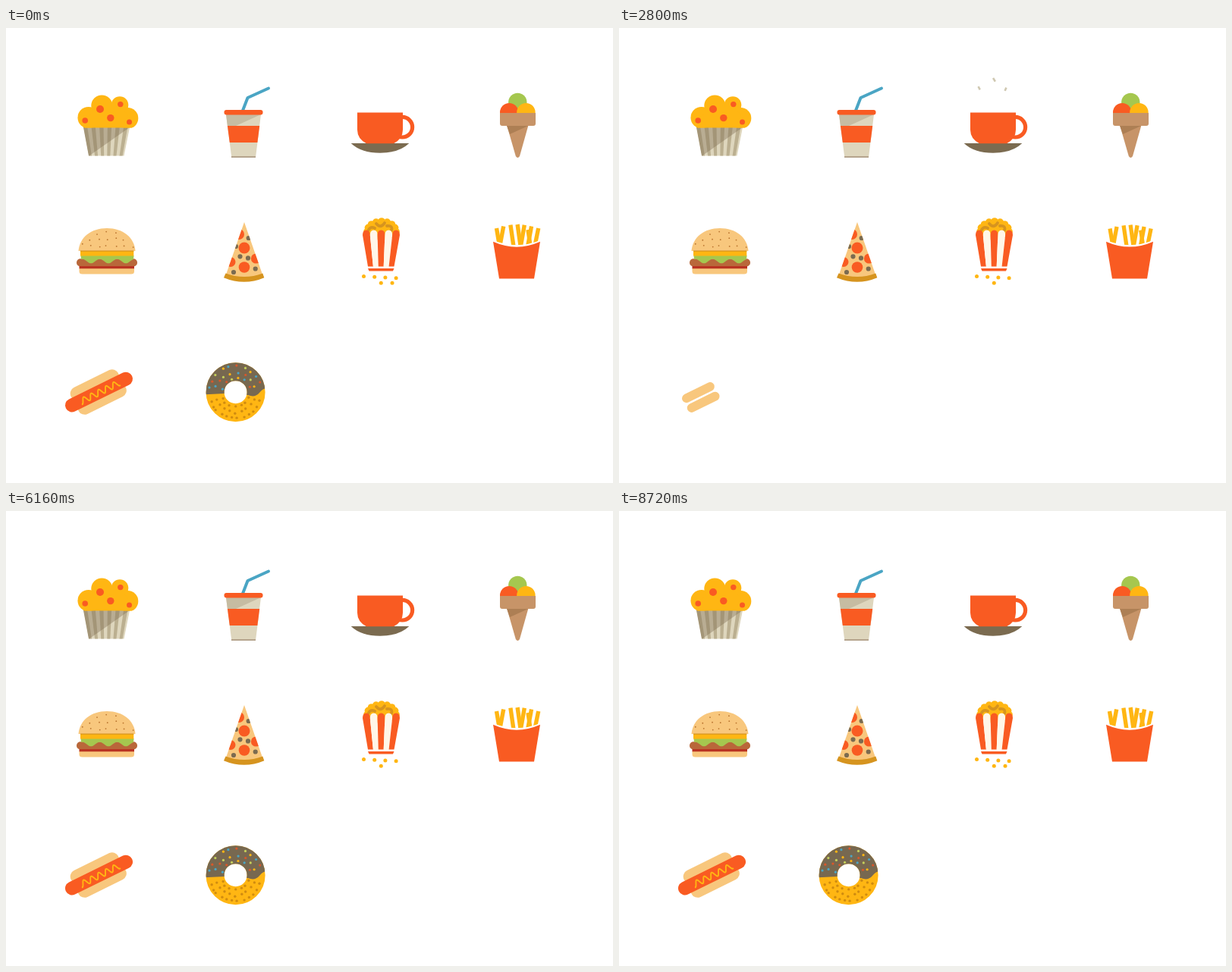
Animation of 800 by 600 pixels, one loop 8.76 s. Source, as an HTML page:

```html
<!DOCTYPE html>
<html lang="en">
<head>
<meta charset="utf-8">
<title>Food icons</title>
<style>
html, body { margin: 0; width: 100%; height: 100%; overflow: hidden; background: #fff; }
svg { display: block; width: 800px; height: 600px; }
.o { fill: #f95b22; } .y { fill: #ffb613; } .c { fill: #ded6bd; } .d { fill: #7b6b50; }
.t { fill: #c79468; } .b { fill: #f8c77d; } .g { fill: #a5c74f; } .k { fill: #d6941f; }
.line { fill: none; stroke-linecap: round; stroke-linejoin: round; }
.cut { stroke-linecap: butt; }
</style>
</head>
<body>
<!-- data-pop: pivot x, pivot y, start time in ms -->
<svg viewBox="0 0 800 600">
  <defs>
    <clipPath id="wrapClip"><path d="M102 131H163L155.5 168.5H109Z"/></clipPath>
    <clipPath id="topClip"><path d="M90 80H180V131.5H90Z"/></clipPath>
    <clipPath id="scoopClip"><path d="M640 60H710V113H640Z"/></clipPath>
    <clipPath id="sliceClip"><path d="M314 256L290 325Q314 334 338 325Z"/></clipPath>
    <clipPath id="glazeClip"><path d="M258 435H347V474Q338 475 334 481Q328 488 319 484L288 482L258 483.5Z"/></clipPath>
  </defs>

  <g data-pop="132 168 40" clip-path="url(#wrapClip)">
    <path class="c" d="M100 131H165V169H100Z"/>
    <g id="pleats" fill="#bbaf90"></g>
    <path d="M100 131H163L109 169H100Z" fill="#7d6a50" opacity=".38"/>
  </g>
  <g data-pop="134 131 140">
    <g class="y" clip-path="url(#topClip)">
      <circle cx="108.8" cy="118.2" r="14.3"/><circle cx="126.3" cy="102.5" r="14"/>
      <circle cx="150" cy="101.5" r="11.3"/><circle cx="160.3" cy="119" r="14"/>
      <path d="M103 122L120 104H152L166 122V132H103Z"/>
    </g>
    <g class="o">
      <circle cx="124" cy="107" r="5"/><circle cx="150.8" cy="100.6" r="3.7"/>
      <circle cx="137.8" cy="118.6" r="4.7"/><circle cx="104.2" cy="122" r="3.8"/>
      <circle cx="162.5" cy="124" r="3.5"/>
    </g>
  </g>

  <g data-pop="313 170 540">
    <path id="straw" class="line" d="M310 114L318.5 92L346 79.5" stroke="#4aa5c4" stroke-width="4"/>
    <path class="c" d="M290 114H336L329 170.5H297.3Z"/>
    <path d="M290 114H336L303 129H291.9Z" fill="#c6bca2"/>
    <path class="o" d="M291.9 129H334.2L331.4 151H294.8Z"/>
    <path d="M297 169H329V171H297Z" fill="#b5a48d"/>
    <rect class="o" x="287.5" y="108" width="51" height="6.6" rx="3"/>
  </g>

  <g data-pop="493 158 820">
    <circle class="line" cx="522.3" cy="130.7" r="13.3" stroke="#f95b22" stroke-width="5.2"/>
    <path class="d" d="M454.7 152H531.3Q518 164.7 493 164.7T454.7 152Z"/>
    <path class="o" d="M463 111.5H523V134Q523 146 511 152.3H475Q463 146 463 134Z"/>
  </g>
  <g id="steam" class="line cut" stroke="#cfc8b1" stroke-width="2.6">
    <path pathLength="1" d="M472 105Q471 98 475.5 95.5C480 92 478.5 86 473.5 77"/>
    <path pathLength="1" d="M491.3 97Q492 91 496 87C501 81 499 75 493 66"/>
    <path pathLength="1" d="M507 104.5Q513.5 101 512.5 96C509 90 506 87 510.5 78.5"/>
  </g>

  <circle id="ball" class="g" cx="674.3" cy="98" r="12.2"/>
  <g id="cone">
    <g clip-path="url(#scoopClip)">
      <circle data-pop="663 112 590" class="o" cx="663.2" cy="111.2" r="12.2"/>
      <circle data-pop="685 112 640" class="y" cx="685.4" cy="111.2" r="12.2"/>
    </g>
    <path class="t" d="M660 128H688.5L677 169Q674.3 173 671.8 169Z"/>
    <path d="M660 129H688.2L664 140Z" fill="#ad7f54"/>
    <path class="t" d="M651 112H698V126Q698 129 695 129H654Q651 129 651 126Z"/>
  </g>

  <g id="burger">
    <path class="b" d="M96.5 317H169V321Q169 324.5 165 324.5H100.5Q96.5 324.5 96.5 321Z"/>
    <g>
      <rect x="93" y="304.3" width="80" height="10.2" rx="5" fill="#b9673a"/>
      <path d="M96.5 314H169V317.3H96.5Z" fill="#b93322"/>
    </g>
    <path id="lettuce" class="g"/>
    <path class="y" d="M98 294H168.3V300.6H98Z"/>
    <g>
      <path class="b" d="M95.5 294C97 276 112 264 133 264S169 276 170.5 294Z"/>
      <path class="k" d="M98 293.5H168.3V294.8H98Z"/>
      <g id="seeds" fill="#b9742f"></g>
    </g>
  </g>

  <g data-pop="314 295 1360">
    <g clip-path="url(#sliceClip)">
      <path class="b" d="M285 250H343V340H285Z"/>
      <g class="o">
        <circle cx="314" cy="290" r="7.5"/><circle cx="307" cy="272" r="7"/><circle cx="296" cy="308.5" r="6.5"/>
        <circle cx="314" cy="315.5" r="7.3"/><circle cx="329.5" cy="304" r="6.6"/>
      </g>
      <path class="line" stroke="#7b6b50" stroke-width="6.2"
        d="M319.7 277h0M308.5 301.3h0M319 303.4h0M303 288h0M300 322h0M328.7 317.5h0"/>
    </g>
    <path class="k" d="M289.5 323.5Q314 332.5 338.3 323.5L340.3 329.2Q314 340.5 287 329.2Z"/>
  </g>

  <g id="kernels">
    <g id="puffs" class="y"><ellipse cx="495" cy="267" rx="21" ry="13"/></g>
    <path class="line" stroke="#d6941f" stroke-width="3.8"
      d="M478 266Q481 261 486 264M488 258Q494 265 499 257M502 261Q510 260 508 267"/>
  </g>
  <g id="bucket" data-pop="494 320 1740"><path class="o" d="M477 317H511.5L510 320.5H478.5Z"/></g>
  <g id="crumbs" class="y"></g>

  <g id="sticks" class="line cut" stroke="#ffb613" stroke-width="5.4"></g>
  <g data-pop="673 330 2100">
    <path d="M641 279.5Q673 293 705 279.5L704 284Q673 297 642 284Z" fill="#fff"/>
    <path class="o" d="M642 281.8Q673 295.5 704 281.8L696 330.5H650Z"/>
  </g>

  <g id="hotdog">
    <path data-pop="79.7 501 2738" class="line" d="M93.5 482L140 459M103.5 501L150 478" stroke="#f8c77d" stroke-width="17.6"/>
    <path data-pop="80 501 2830" class="line" d="M87 497.5L158 462.7" stroke="#f95b22" stroke-width="18"/>
    <path id="mustard" class="line cut" pathLength="1" transform="translate(124.5 481) rotate(-26.3)" stroke="#ffb613" stroke-width="1.9"/>
  </g>

  <g id="donut">
    <circle class="line" cx="302.6" cy="480.2" r="27" stroke="#ffb613" stroke-width="24"/>
    <g id="pores" fill="#d08c10"></g>
    <g clip-path="url(#glazeClip)">
      <circle class="line" cx="302.6" cy="480.2" r="27" stroke="#776850" stroke-width="24"/>
    </g>
    <g id="sprinkles"></g>
  </g>
</svg>
<script>
const LOOP = 8760, TAU = 2 * Math.PI;
const el = {};
for (const node of document.querySelectorAll('svg [id]')) el[node.id] = node;

// Building helpers
function add(parent, tag, attrs) {
  const node = document.createElementNS('http://www.w3.org/2000/svg', tag);
  for (const k in attrs) node.setAttribute(k, attrs[k]);
  return parent.appendChild(node);
}
const dot = (parent, cx, cy, r, more) => add(parent, 'circle', { cx, cy, r, ...more });
const times = (n, make) => Array.from({ length: n }, (_, i) => make(i));
const curve = (from, to, f) => times(to - from + 1, i => `L${from + i} ${f(from + i).toFixed(2)}`).join('');

let seed = 7;
const jitter = size => {
  seed = seed * 16807 % 2147483647;
  return (seed / 2147483647 - 0.5) * size;
};

times(6, i => {
  const x = 102 + i * 10.6, low = 109 + i * 8.1;
  add(el.pleats, 'path', { d: `M${x} 131h5.3L${low + 4} 169H${low}Z` });
});

// Bun seeds: wider rows further down
times(3, row => {
  const n = 3 + row * 2;
  times(n, i => dot(el.seeds, 133 + (i - (n - 1) / 2) * 11 + jitter(4), 270 + row * 8.5 + jitter(5), 0.9));
});
el.lettuce.setAttribute('d',
  `M168.5 300H98.5${curve(99, 168, x => 307.5 + 2.8 * Math.cos((x - 112) / 23 * TAU))}Z`);

times(9, i => {
  const a = Math.PI * i / 8;
  dot(el.puffs, 495 - 19 * Math.cos(a), 268.5 - 13.5 * Math.sin(a), 4.8);
});
times(5, i => {
  const x = 470 + i * 9.8, low = 477 + i * 6.9;
  add(el.bucket, 'path', {
    d: `M${x} 273Q${x} 266.5 ${x + 4.9} 266.5T${x + 9.8} 273L${low + 6.9} 314.5H${low}Z`,
    fill: i % 2 ? '#fff6e8' : '#f95b22'
  });
});
const crumbs = [
  ...times(4, i => dot(el.crumbs, 471.5 + i * 14.2, 327.6 + i * 0.7, 2.5)),
  ...times(2, i => dot(el.crumbs, 494.3 + i * 14.7, 336.3, 2.5))
];

// Fries lean left or right
[...'+-++---'].forEach((lean, i) => {
  const x = 646.5 + i * 9.2, y = 264 - 5 * Math.sin(Math.PI * i / 6);
  add(el.sticks, 'path', { d: `M${x} ${y}L${x + (lean === '+' ? 4.5 : -5.5)} 291` });
});
add(el.sticks, 'path', { d: 'M688 266L692 294' });

el.mustard.setAttribute('d', 'M-28 4' + curve(-28, 28, x => -1 + 4 * Math.cos((x + 28) / 11 * TAU)));

// Rings of dots over one arc of the donut
function ringDots(from, sweep, step, place) {
  for (const r of [19, 26.5, 34]) {
    const n = Math.round(r * sweep / step);
    times(n, i => {
      const a = from + (i + 0.5) * sweep / n + jitter(0.15), d = r + jitter(3);
      place(302.6 + d * Math.cos(a), 480.5 + d * Math.sin(a), i);
    });
  }
}
const tints = ['#4aa5c4', '#d9582b', '#c5cf5a', '#ffb613'];
ringDots(0.2, 2.75, 8, (x, y) => dot(el.pores, x, y, 1.7));
ringDots(3.2, 2.9, 9.5, (x, y, i) => dot(el.sprinkles, x, y, 1.6, { fill: tints[i % 4] }));

// Motion helpers
const clamp = x => Math.max(0, Math.min(1, x));
const span = (t, start, len) => clamp((t - start) / len);
const easeOut = u => 1 - (1 - u) ** 3;
const spring = (t, start) => {
  const age = t - start;
  return age <= 0 ? 0 : 1 - Math.exp(-age / 110) * Math.cos(TAU * age / 420);
};
const bump = (t, peak, half) => Math.cos(clamp(Math.abs(t - peak) / half) * Math.PI / 2) ** 2;
const hop = (t, peak, half, height) => -height * (1 - clamp(Math.abs(t - peak) / half) ** 2);

const show = (node, on) => node.setAttribute('visibility', on ? 'visible' : 'hidden');
function scale(node, x, y, s, dx = 0, dy = 0) {
  show(node, s > 0.001);
  node.setAttribute('transform', `translate(${x + dx} ${y + dy}) scale(${s}) translate(${-x} ${-y})`);
}
function trim(node, from, to) {
  show(node, to - from > 0.002);
  node.setAttribute('stroke-dasharray', `0 ${from} ${to - from} 2`);
}

const pops = [...document.querySelectorAll('[data-pop]')]
  .map(node => [node, ...node.dataset.pop.split(' ').map(Number)]);
const layers = [...el.burger.children];
const wisps = [...el.steam.children];

function drawSteam(t) {
  const age = t - 755;
  const p = age < 0 ? 1 : clamp(age % 1375 / 700);
  const head = p < 1 ? 1 - (1 - p) ** 2 : 0;
  const tail = p < 1 ? clamp((p - 0.48) / 0.52) ** 2 : 0;
  wisps.forEach(w => trim(w, tail, head));
}

function draw(t) {
  // The loop opens on the finished set
  if (t < 40) t = LOOP;
  for (const [node, x, y, start] of pops) scale(node, x, y, spring(t, start));

  const rise = spring(t, 1028), left = 40 * (1 - rise);
  scale(el.straw, 312, 109, clamp(rise * 1.25), -0.38 * left, 0.92 * left);
  drawSteam(t);

  scale(el.cone, 674.5, 171, spring(t, 480) * (1 - 0.045 * bump(t, 1120, 110)));
  show(el.ball, t > 630);
  el.ball.setAttribute('cy', 98 + hop(t, 900, 270, 42) + hop(t, 5330, 250, 33));

  layers.forEach((layer, i) => scale(layer, 133, 321 - i * 7, easeOut(span(t, 1180 + i * 70, 240))));

  scale(el.kernels, 495, 275, spring(t, 1860), 0, hop(t, 6560, 200, 5));
  crumbs.forEach((c, i) => {
    const start = i < 5 ? 2080 + i * 90 : 6600;
    show(c, t > start);
    c.setAttribute('transform', `translate(0 ${14 * (span(t, start, 220) ** 2 - 1)})`);
  });

  scale(el.sticks, 673, 290, spring(t, 2450), 0, hop(t, 6950, 230, 17));

  scale(el.hotdog, 122, 480, 1 + 0.025 * bump(t, 7400, 220));
  trim(el.mustard, 0, easeOut(span(t, 3020, 380)));

  scale(el.donut, 302.6, 480.2, spring(t, 3060) + 0.17 * bump(t, 7940, 240));
}

const begin = performance.now();
function tick() {
  draw((performance.now() - begin) % LOOP);
  requestAnimationFrame(tick);
}
tick();
</script>
</body>
</html>
```
